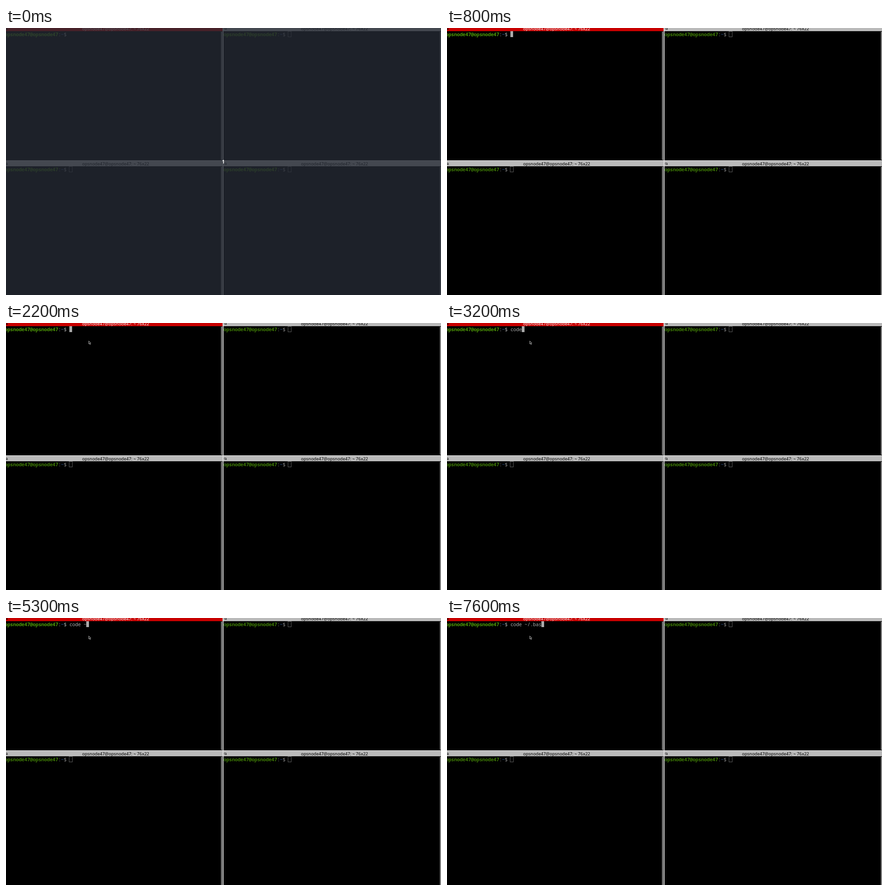
Write an HTML page with a canvas that moves like this. It is 954 by 587 pixels and loops after 8 s.

```html
<!DOCTYPE html>
<html lang="en">
<head>
<meta charset="utf-8">
<title>Split terminal</title>
<style>
  html, body { margin: 0; width: 100%; height: 100%; overflow: hidden; background: #000; }
  canvas { display: block; }
</style>
</head>
<body>
<canvas id="stage" width="954" height="587"></canvas>
<script>
const ctx = document.getElementById('stage').getContext('2d');
const LOOP = 8000, CELL = 6.18, PANE_W = 480, PANE_H = 297;
const MONO = '10.7px "Noto Sans Mono", "DejaVu Sans Mono", monospace';
const SANS = '9.45px "Noto Sans", "Open Sans", sans-serif';
const LOGIN = 'opsnode47@opsnode47';
const PROMPT_CELLS = LOGIN.length + 4;
const COMMAND = 'code ~/.bas';

// Time at which each character of COMMAND appears
const KEYS = [2600, 2700, 3000, 3200, 3500, 5300, 6500, 7000, 7400, 7600, 7600];
// Cursor visibility flips at each of these times, starting hidden
const BLINKS = [800, 1400, 2000, 2500, 2600, 4000, 4600, 5800, 6500];

function rect(x, y, w, h, color) {
  ctx.fillStyle = color;
  ctx.fillRect(x, y, w, h);
}

// Terminal text, one character per grid cell
function cells(text, column, color, bold = false) {
  ctx.font = (bold ? 'bold ' : '') + MONO;
  ctx.fillStyle = color;
  ctx.textAlign = 'left';
  [...text].forEach((char, i) => ctx.fillText(char, -3 + (column + i) * CELL, 17.5));
}

function titleBar(active) {
  const ink = active ? '#fff' : '#000';
  rect(0, -5, 475, 12, active ? '#c80000' : '#bababa');
  ctx.font = SANS;
  ctx.fillStyle = ink;
  ctx.textAlign = 'center';
  ctx.fillText(LOGIN + ': ~ 76x22', 240.5, 5);
  ctx.lineWidth = 0.8;
  ctx.strokeStyle = active ? '#400' : '#444';
  ctx.strokeRect(-1.5, -0.5, 4, 3);
  ctx.strokeRect(-0.5, 1.5, 4, 2);
}

function pane(column, row) {
  const active = !column && !row;
  ctx.save();
  ctx.translate(column * PANE_W, row * PANE_H);
  ctx.beginPath();
  ctx.rect(column ? -3 : 0, -5, column ? 478 : 475, 300);
  ctx.clip();
  titleBar(active);
  if (column) rect(-3, -5, 4, 12, '#bababa');
  if (column) {
    ctx.lineWidth = 0.8;
    ctx.strokeStyle = '#444';
    ctx.strokeRect(-1.5, -0.5, 4, 3);
  }
  rect(471.5, 8, 2.5, 282, '#888');
  cells(LOGIN, 0, active ? '#4e9a06' : '#3e7b05', true);
  cells(':', LOGIN.length, active ? '#aaa' : '#888');
  cells('~', LOGIN.length + 1, active ? '#3465a4' : '#2a5183', true);
  cells('$', LOGIN.length + 2, active ? '#aaa' : '#888');
  if (!active) {
    ctx.lineWidth = 1;
    ctx.strokeStyle = '#5c5c5c';
    ctx.strokeRect(138.5, 7.5, 7, 12);
  }
  ctx.restore();
}

function commandLine(t) {
  const typed = KEYS.filter(key => key <= t).length;
  cells(COMMAND.slice(0, typed), PROMPT_CELLS, '#aaa');
  if (BLINKS.filter(flip => flip <= t).length % 2) {
    rect(Math.round(-3 + (PROMPT_CELLS + typed) * CELL), 7, 6, 13, '#aaa');
  }
}

function pointer(t) {
  if (t < 1200) return;
  const left = Math.max(0, 1 - (t - 1200) / 800);
  ctx.save();
  ctx.translate(Math.round(181 - 128 * left ** 4.6), Math.round(39 + 21 * left ** 1.4));
  ctx.beginPath();
  [[.5, .5], [.5, 7], [2, 5.7], [3.2, 8.3], [4.4, 7.8], [3.3, 5.2], [5.2, 5]]
    .forEach(([x, y]) => ctx.lineTo(x, y));
  ctx.closePath();
  ctx.fillStyle = '#111';
  ctx.fill();
  ctx.lineWidth = 0.8;
  ctx.strokeStyle = '#ccc';
  ctx.stroke();
  ctx.restore();
}

function dimScreen() {
  rect(0, 0, 954, 587, 'rgba(38, 42, 52, 0.79)');
  ctx.font = 'bold 10px "Noto Sans", sans-serif';
  ctx.fillStyle = '#fff';
  ctx.textAlign = 'center';
  ctx.fillText('1', 476.5, 298);
}

function draw(now) {
  const t = Math.floor(now % LOOP / 100) * 100;
  rect(0, 0, 954, 587, '#000');
  for (const row of [0, 1]) for (const column of [0, 1]) pane(column, row);
  rect(0, 291, 954, 1, '#eee');
  rect(475, 0, 2, 587, '#ddd');
  commandLine(t);
  pointer(t);
  if (t < 100) dimScreen();
}

const start = performance.now();
function tick() {
  draw(performance.now() - start);
  requestAnimationFrame(tick);
}
tick();
</script>
</body>
</html>
```
